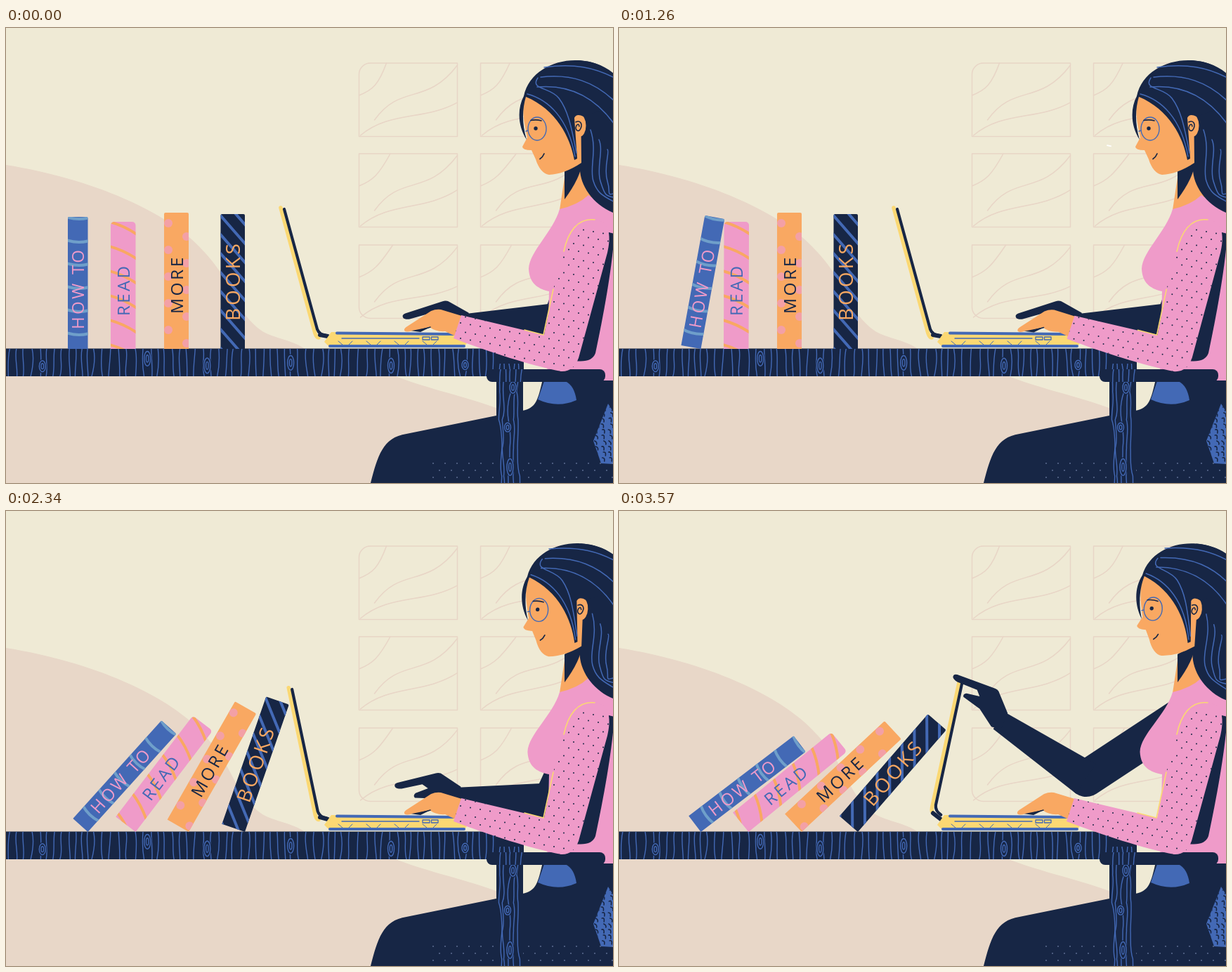
An HTML page with a canvas that plays this animation: 864x648 px, repeating every 3.6 s.

```html
<!DOCTYPE html>
<html lang="en">
<head>
<meta charset="utf-8">
<title>How to read more books</title>
<style>
html, body { margin: 0; width: 100%; height: 100%; overflow: hidden; background: #efead5; }
canvas { display: block; width: 864px; height: 648px; }
</style>
</head>
<body>
<canvas id="stage" width="864" height="648"></canvas>
<script>
const ctx = document.getElementById('stage').getContext('2d');
const LOOP = 3600, DESK = 457;
const CREAM = '#efead5', SAND = '#e8d7c8', NAVY = '#172645', BLUE = '#4369b5', PINK = '#ef9bc9',
  ORANGE = '#f9a862', YELLOW = '#fbd873', SKY = '#6f9fca', FAINT = '#e8d5c6';

const fill = (d, color) => { ctx.fillStyle = color; ctx.fill(new Path2D(d)); };
const line = (d, color, width = 1.4) => {
  ctx.strokeStyle = color;
  ctx.lineWidth = width;
  ctx.stroke(new Path2D(d));
};
const oval = (x, y, rx, ry, color) => {
  ctx.fillStyle = color;
  ctx.beginPath();
  ctx.ellipse(x, y, rx, ry, 0, 0, 7);
  ctx.fill();
};
const ring = (x, y, rx, ry, color) => {
  ctx.strokeStyle = color;
  ctx.lineWidth = 1.4;
  ctx.beginPath();
  ctx.ellipse(x, y, rx, ry, 0, 0, 7);
  ctx.stroke();
};
const group = draw => { ctx.save(); draw(); ctx.restore(); };
const turn = (x, y, angle) => { ctx.translate(x, y); ctx.rotate(angle); ctx.translate(-x, -y); };
const rad = deg => deg * Math.PI / 180;
const mix = (a, b, k) => a + (b - a) * k;
const part = (t, from, to) => Math.min(1, Math.max(0, (t - from) / (to - from)));
const ease = (t, from, to) => { const u = part(t, from, to); return u * u * (3 - 2 * u); };

function random(seed) {
  return () => (seed = seed * 16807 % 2147483647) / 2147483647;
}

const stripes = (book, step, drop, bend, color) => {
  for (let y = book.y - step; y < DESK + step; y += step)
    line(`M${book.x - 2} ${y}Q${book.x + book.w / 2} ${y + drop / 2 + bend} ${book.x + book.w + 2} ${y + drop}`, color, 4);
};
const dots = book => {
  for (let i = 0; i < 10; i++) oval(book.x + (i % 2 ? 32 : 6), book.y + 15 + i * 19, 6, 6, '#f3a0a6');
};

const books = [
  { x: 88, y: 269, w: 28.5, color: BLUE, ink: PINK, text: 'HOW TO', size: 24, foot: 429,
    decorate: b => stripes(b, 33, 1, 5, SKY) },
  { x: 149, y: 276, w: 35.5, color: PINK, ink: BLUE, text: 'READ', size: 24, foot: 410,
    decorate: b => stripes(b, 35, 18, -4, ORANGE) },
  { x: 225, y: 263, w: 35, color: ORANGE, ink: NAVY, text: 'MORE', size: 24.5, foot: 407, decorate: dots },
  { x: 305.5, y: 265, w: 34.5, color: NAVY, ink: ORANGE, text: 'BOOKS', size: 28, foot: 417,
    decorate: b => stripes(b, 27, 44, 0, BLUE) }
];

// Lean at which a book rests on the top left corner of its neighbour.
function restingLean(book, next, nextLean) {
  const s = Math.sin(nextLean), c = Math.cos(nextLean), h = DESK - next.y;
  const x = next.x + next.w - next.w * c + h * s - book.x - book.w;
  return Math.atan2(x, next.w * s + h * c);
}

// The gust tips the first book; every book pushes the next one on contact.
function bookLeans(t) {
  const gust = 1 - (1 - part(t, 640, 1340)) ** 2;
  const leans = [rad(10.2 * gust + 42.4 * ease(t, 1180, 2900))];
  for (let i = 0; i < books.length - 1; i++) {
    let low = 0, high = 1;
    for (let n = 0; n < 22; n++) {
      const mid = (low + high) / 2;
      if (restingLean(books[i], books[i + 1], mid) < leans[i]) low = mid; else high = mid;
    }
    leans.push(low);
  }
  return leans;
}

const HINGE = { x: 468, y: 440, offset: 27.6, rest: rad(-15.5) };

// The lid turns as far as the corner of the last book pushes it.
function lidTurn(lean) {
  const last = books[books.length - 1], h = DESK - last.y;
  const x = last.x + last.w + h * Math.sin(lean) - HINGE.x;
  const y = HINGE.y - DESK + h * Math.cos(lean);
  return Math.max(0, Math.atan2(x, y) + Math.asin(HINGE.offset / Math.hypot(x, y)) - HINGE.rest + rad(.6));
}

function drawWindows() {
  const rnd = random(31);
  for (let i = 0; i < 6; i++) {
    const x = 502.5 + i % 2 * 173, y = 50 + (i >> 1) * 130 - (i < 2 ? 0 : 1), wave = () => 12 * rnd();
    const radii = [i === 0 ? 16 : 0, 0, 0, i === 4 ? 16 : 0];
    ctx.strokeStyle = FAINT;
    ctx.lineWidth = 1.5;
    ctx.beginPath();
    ctx.roundRect(x, y, 140, 104.5, radii);
    ctx.stroke();
    line(`M${x + 39 + wave()} ${y}C${x + 28} ${y + 30} ${x + 20} ${y + 38} ${x} ${y + 46}`
      + `M${x + 140} ${y + 2 + wave()}C${x + 95} ${y + 62} ${x + 60} ${y + 28} ${x + 22} ${y + 81}`
      + `M${x + 2} ${y + 103}C${x + 43} ${y + 68} ${x + 93} ${y + 82} ${x + 140} ${y + 51 + wave()}`, FAINT, 1.5);
  }
}

function drawWall() {
  ctx.fillStyle = CREAM;
  ctx.fillRect(0, 0, 864, 648);
  fill('M0 195C120 214 235 262 285 322C325 366 325 404 365 432C382 442 410 445 425 457H0Z', SAND);
  fill('M0 490H540C590 512 650 523 700 542L760 556V648H0Z', SAND);
  drawWindows();
}

function drawStreak(t) {
  const tail = Math.max(-5, t - 566), head = Math.min(700, t - 460);
  if (head <= 0 || tail >= head) return;
  ctx.beginPath();
  for (let i = 0; i <= 20; i++) {
    const x = mix(tail, head, i / 20);
    ctx.lineTo(x, 138 + .0004 * (x - 425) ** 2);
  }
  ctx.strokeStyle = '#fff';
  ctx.lineWidth = 1.8;
  ctx.stroke();
}

function drawBook(book, lean) {
  const { x, y, w, size } = book;
  group(() => {
    turn(x + w, DESK, lean);
    group(() => {
      ctx.beginPath();
      ctx.roundRect(x, y, w, DESK - y, book.color === PINK ? [5, 5, 0, 0] : [2, 2, 0, 0]);
      ctx.clip();
      ctx.fillStyle = book.color;
      ctx.fillRect(x - 1, y - 1, w + 2, 200);
      book.decorate(book);
    });
    ctx.translate(x + w / 2 + size * .37, book.foot);
    ctx.rotate(-Math.PI / 2);
    ctx.font = `${size}px "Open Sans", sans-serif`;
    ctx.letterSpacing = size * .14 + 'px';
    ctx.fillStyle = book.ink;
    ctx.fillText(book.text, 0, 0);
  });
}

// Wavy upright fibres that bulge around evenly spread knots.
function drawGrain(x, y, w, h, gap, wave, knots, seed) {
  const rnd = random(seed);
  group(() => {
    ctx.beginPath();
    ctx.rect(x, y, w, h);
    ctx.clip();
    for (let fx = x + gap / 2; fx < x + w; fx += gap * (.75 + rnd() * .5)) {
      let d = `M${fx} ${y}`;
      const bend = () => fx + (rnd() - .5) * wave;
      for (let fy = y; fy < y + h; fy += 40) d += `C${bend()} ${fy + 13} ${bend()} ${fy + 27} ${bend()} ${fy + 40}`;
      line(d, BLUE);
    }
    for (let i = 0; i < knots; i++) {
      const kx = x + w * (h > w ? .25 + .5 * rnd() : (i + .35 + .4 * rnd()) / knots);
      const ky = h > w ? y + h * (i + .6) / knots : y + h * (.35 + .3 * rnd());
      const ry = 6 + 6 * rnd();
      oval(kx, ky, 6, ry + 2, NAVY);
      ring(kx, ky, 4.5, ry, BLUE);
      ring(kx, ky, 1.8, ry / 2, BLUE);
    }
  });
}

function drawDesk() {
  ctx.fillStyle = NAVY;
  ctx.fillRect(0, 456.5, 737, 39.5);
  ctx.fillRect(698, 476, 38, 172);
  drawGrain(0, 457, 696, 39, 10.5, 6, 6, 77);
  drawGrain(700, 478, 35, 170, 7, 6, 3, 19);
}

function drawLid(angle) {
  group(() => {
    turn(HINGE.x, HINGE.y, angle);
    line('M391 256L440 435Q442 441 445 441', YELLOW, 5.5);
    line('M396 258L443 429Q446 437 456 438', NAVY, 4.2);
  });
  line(`M447 ${437 - angle * 14}L458 439`, NAVY, 6);
}

function drawLaptopBase() {
  fill('M453 447L463 433L640 436L656 449L652 454H460Z', YELLOW);
  line('M471 434.5L640 436', BLUE, 4);
  line('M461 453H652', BLUE, 4);
  line('M478 442H588M593 440H603V444H593ZM605.5 440H615V444H605.5Z', BLUE, 1.3);
  for (let i = 0; i < 8; i++) line(`M${473 + i * 20} 446l${i % 2 ? -5 : 6} 5`, BLUE, 1);
}

function drawFarArm(t) {
  const reach = ease(t, 2200, 2890);
  const ex = mix(790, 665, reach), ey = mix(416, 381, reach);
  const wx = mix(655, 541, reach), wy = mix(421, 298, reach);
  const len = Math.hypot(ex - wx, ey - wy), nx = (ey - wy) / len, ny = (wx - ex) / len;
  line(`M${ex} ${ey}L${mix(835, 800, reach)} 292`, NAVY, 52);
  fill(`M${wx + nx * 14} ${wy + ny * 14}L${ex + nx * 25} ${ey + ny * 25}L${ex - nx * 26} ${ey - ny * 26}`
    + `L${wx - nx * 15} ${wy - ny * 15}Z`, NAVY);
  group(() => {
    ctx.translate(wx, wy);
    ctx.rotate(rad(mix(-22, 16, reach)));
    fill('M9 -13L-10 -37Q-13 -42 -20 -42L-75 -46Q-81 -46 -80 -41Q-79 -38 -72 -36L-42 -33L-36 -25L-55 -24'
      + 'Q-60 -22 -58 -18L-31 -8L-8 12L6 12Z', NAVY);
  });
}

function drawLegs() {
  fill('M519 648C529 610 536 583 570 578L698 552L735 545C755 541 757 530 764 500H864V648Z', NAVY);
  fill('M766 503L757 529Q785 542 812 530Q809 509 796 503Z', BLUE);
  const patch = 'M857 535L864 546V621L847 620L836 588Z', rnd = random(5);
  fill(patch, BLUE);
  group(() => {
    ctx.clip(new Path2D(patch));
    for (let i = 0; i < 30; i++)
      line(`M${837 + i % 3 * 10 + rnd() * 4} ${540 + (i / 3 | 0) * 8}q4 ${rnd() * 6 - 3} 3 5`, NAVY, 1.6);
  });
  for (let row = 0; row < 3; row++)
    for (let x = 608 + row % 2 * 9; x < 864; x += 17) oval(x, 620 + row * 10, .9, .9, '#65759a');
}

function drawHead(t, turned) {
  group(() => {
    turn(810, 195, rad(4.5 * turned));
    fill('M818 150L817 195C815 222 834 250 864 263L900 275V90L864 64C850 52 830 46 810 46L790 100Z', NAVY);
    fill('M738 98C734 115 737 134 742 156L735 169Q735 174 748 174L754 187C758 200 765 208 773 209Q795 208 819 192'
      + 'L818 90L760 80Z', ORANGE);
    oval(817, 139, 8.5, 15.5, ORANGE);
    line('M811 134C817 131 821 136 818 143S809 145 812 139Q815 135 816 140', NAVY, 1.6);
    fill('M737 97C744 64 777 46 810 46C842 46 858 59 870 72V110L822 126Q812 121 809 128L813 186L809 188'
      + 'C803 155 783 116 740 98C735 115 734 135 741 159C729 140 727 116 737 97Z', NAVY);
    for (let i = 0; i < 3; i++) {
      line(`M${756 + i * 5} ${84 - i * 14}C${800 + i * 4} ${80 - i * 15} 838 ${96 - i * 20} 868 ${140 - i * 34}`, BLUE, 1.5);
      line(`M${832 + i * 12} ${145 + i * 14}C${842 + i * 9} 175 ${830 + i * 10} 199 ${836 + i * 10} 218S852 240 870 ${250 - i * 8}`,
        BLUE, 1.5);
    }
    line('M757 71C745 88 775 84 787 100S804 136 812 178M742 94C772 102 800 128 810 183', BLUE, 1.5);
    ring(756, 143.5, 13, 16.5, BLUE);
    line('M740 147L743 146', BLUE);
    line('M747 131.5Q755 130 762 132', NAVY, 1.6);
    line('M760 186.5Q764 184 766 179', NAVY, 1.7);
    const blink = start => Math.max(0, 1 - Math.abs(t - start - 75) / 75);
    oval(754, 143, 2.7, 2.7 * (1 - .85 * Math.max(blink(3415), blink(330))), NAVY);
  });
}

function drawTorso(turned) {
  const sway = -2.5 * turned;
  fill('M797 200L819 190L835 240L808 258L788 259Z', ORANGE);
  fill('M795 204L820 191Q818 213 795 244Z', NAVY);
  fill(`M788 258Q814 252 829 238L864 263V502H770L773 375C${760 + sway} 372 ${745 + sway} 366 ${744 + sway} 343`
    + `C${745 + sway} 318 779 290 788 258Z`, PINK);
  fill('M858 291L866 293C862 350 848 420 839 463Q834 477 810 474Z', NAVY);
}

function drawArmrest() {
  ctx.fillStyle = NAVY;
  ctx.beginPath();
  ctx.roundRect(684, 486, 169, 18, 8);
  ctx.fill();
  drawGrain(700, 486, 35, 18, 8, 5, 0, 3);
}

const sleeve = new Path2D('M838 273C861 274 861 300 856 320L815 470Q808 490 790 489C745 480 690 462 637 442L648 409L766 437'
  + 'L779 372L793 320C800 289 814 272 838 273Z');

function drawNearArm(t) {
  const tap = t < 2070 ? Math.sin(Math.PI * t / 690) ** 2 : 0;
  group(() => {
    turn(835, 285, -.013 * tap);
    group(() => {
      turn(640, 425, .025 * tap);
      fill('M575 431Q590 424 602 427L590 433Z', NAVY);
      fill('M652 411L619 401Q612 400 605 403L571 425Q566 428 567 431Q570 434 578 431L603 426Q612 433 625 432L642 440Z', ORANGE);
      line('M590 430L604 426', NAVY, 1.6);
    });
    ctx.fillStyle = PINK;
    ctx.fill(sleeve);
    group(() => {
      ctx.clip(sleeve);
      for (let row = 0; row < 22; row++)
        for (let col = 0; col < 18; col++)
          oval(640 + col * 14 + row % 2 * 7, 255 + row * 11 + col * 2.5, 1, 1, NAVY);
    });
    line('M838 273C814 270 800 290 794 318M779 372L765 437L738 430', YELLOW, 1.6);
  });
}

function draw(t) {
  const turned = ease(t, 2110, 2500), leans = bookLeans(t);
  ctx.lineCap = 'round';
  ctx.lineJoin = 'round';
  drawWall();
  drawStreak(t);
  drawLegs();
  drawDesk();
  books.forEach((book, i) => drawBook(book, leans[i]));
  drawLid(lidTurn(leans[3]));
  drawFarArm(t);
  drawLaptopBase();
  drawTorso(turned);
  drawHead(t, turned);
  drawArmrest();
  drawNearArm(t);
}

let start;
function frame() {
  const now = performance.now();
  start ??= now;
  draw((now - start) % LOOP);
  requestAnimationFrame(frame);
}
frame();
</script>
</body>
</html>
```
